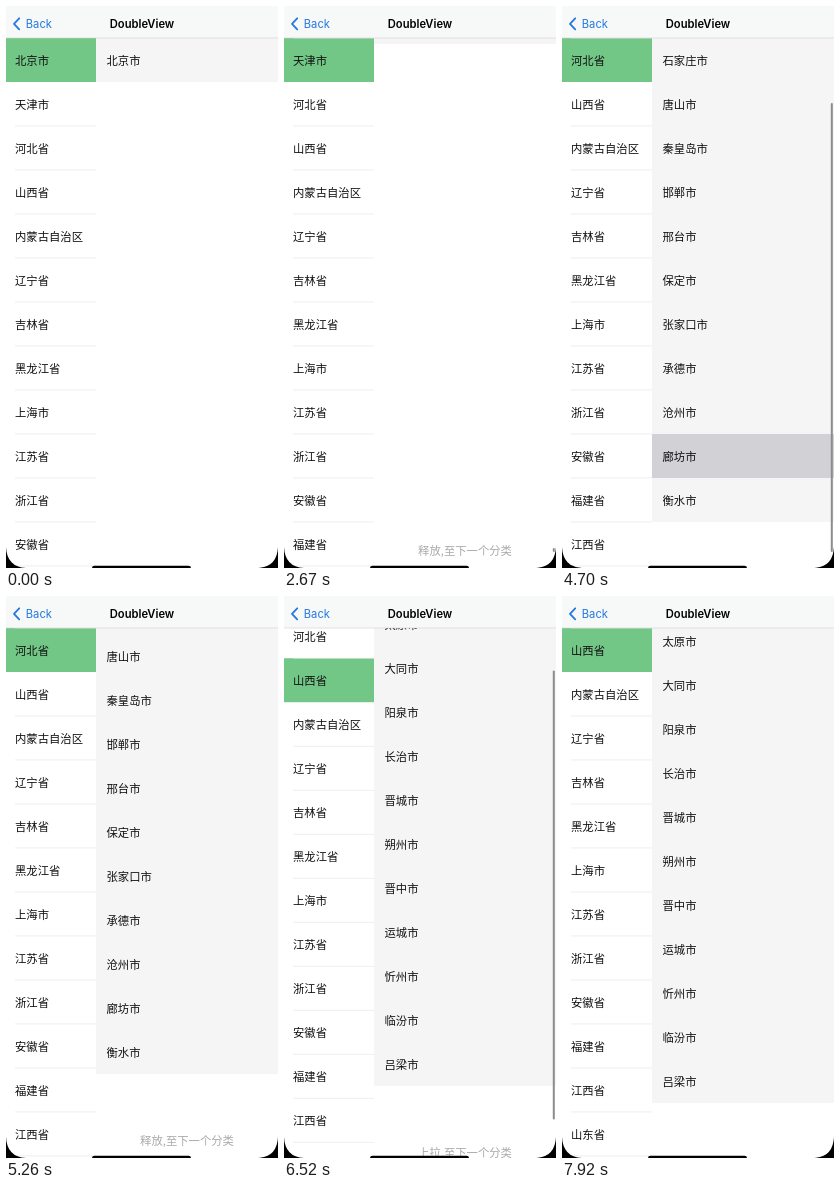
Write an HTML page that moves like this. It is 272x562 px and loops after 7990 ms.

```html
<!DOCTYPE html>
<html lang="zh-CN">
<head>
<meta charset="utf-8">
<title>DoubleView</title>
<style>
  html, body { margin: 0; width: 100%; height: 100%; overflow: hidden; background: #fff; }
  svg { display: block; width: 100vw; height: 100vh; }
  text { font: 11.35px "Noto Sans CJK SC", "Noto Sans CJK", sans-serif; fill: #111; }
  .nav { font-family: Inter, Roboto, sans-serif; font-size: 11.2px; }
  .title { font-weight: 600; fill: #000; }
  .back { fill: #2478e0; }
  .hint { fill: #aaa; text-anchor: middle; }
</style>
</head>
<body>
<svg viewBox="0 0 272 562" preserveAspectRatio="none">
  <defs>
    <clipPath id="leftClip"><rect y="32" width="90" height="530"/></clipPath>
    <clipPath id="rightClip"><rect x="90" y="32" width="182" height="530"/></clipPath>
  </defs>
  <rect width="272" height="562" fill="#fff"/>
  <g clip-path="url(#leftClip)"><g id="left"></g></g>
  <g clip-path="url(#rightClip)">
    <g id="right"></g>
    <text id="hint" class="hint" x="181"></text>
  </g>
  <rect id="bar" x="268.8" width="2" rx="1" fill="#8c8c8c"/>
  <rect width="272" height="32" fill="#f7f8f8"/>
  <rect y="31.7" width="272" height=".6" fill="#cfcfcf"/>
  <path d="M13.2 12.3 L8 17.8 L13.2 23.3" fill="none" stroke="#2478e0" stroke-width="1.8" stroke-linecap="round" stroke-linejoin="round"/>
  <text class="nav back" x="19.8" y="21.8">Back</text>
  <text class="nav title" x="136" y="21.8" text-anchor="middle">DoubleView</text>
  <path d="M0 541 Q1 561 20 562 H0Z M272 541 Q271 561 252 562 H272Z"/>
  <path d="M86 562 Q86 559.7 88.5 559.7 H182.5 Q185 559.7 185 562Z"/>
</svg>
<script>
const LOOP = 7990, TOP = 32, ROW = 44;
const provinces = '北京市 天津市 河北省 山西省 内蒙古自治区 辽宁省 吉林省 黑龙江省 上海市 江苏省 浙江省 安徽省 福建省 江西省 山东省 河南省'.split(' ');
const cities = [
  '北京市',
  '天津市',
  '石家庄市 唐山市 秦皇岛市 邯郸市 邢台市 保定市 张家口市 承德市 沧州市 廊坊市 衡水市',
  '太原市 大同市 阳泉市 长治市 晋城市 朔州市 晋中市 运城市 忻州市 临汾市 吕梁市'
].map(names => names.split(' '));
const PRESSED_ROW = 9;

// Moments at which the next province becomes current
const switches = [990, 3420, 6398];
// Finger drags as [time, pull distance]
const drags = [
  [[500, 0], [940, 46], [990, 46]],
  [[1930, 0], [2670, 38], [3300, 42], [3420, 42]],
  [[4760, 0], [5470, 48], [5820, 51], [6310, 52], [6398, 52]],
  [[7450, 0], [7920, 9], [7990, 10]]
];

const $ = id => document.getElementById(id);
const clamp = x => Math.max(0, Math.min(1, x));
const ease = x => x * x * (3 - 2 * x);
const between = (t, a, b) => t >= a && t < b;

function add(parent, tag, attrs, text) {
  const node = document.createElementNS('http://www.w3.org/2000/svg', tag);
  for (const key in attrs) node.setAttribute(key, attrs[key]);
  if (text) node.textContent = text;
  parent.append(node);
  return node;
}

const marker = add($('left'), 'rect', { width: 90, height: ROW, fill: '#73c786' });
const lines = provinces.map((name, i) => {
  const y = TOP + i * ROW;
  add($('left'), 'text', { x: 9, y: y + 26.8 }, name);
  return add($('left'), 'rect', { x: 9, y: y + 43.6, width: 81, height: .7, fill: '#e6e6e6' });
});

const pages = cities.map(names => {
  const page = add($('right'), 'g', {});
  add(page, 'rect', { x: 90, y: TOP, width: 182, height: names.length * ROW, fill: '#f5f5f5' });
  return page;
});
const pressed = add(pages[2], 'rect', { x: 90, y: TOP + PRESSED_ROW * ROW, width: 182, height: ROW, fill: '#d1d1d6' });
cities.forEach((names, p) => names.forEach((name, i) =>
  add(pages[p], 'text', { x: 100.5, y: TOP + i * ROW + 26.8 }, name)));

function along(points, t) {
  for (let i = 1; i < points.length; i++) {
    const [t0, v0] = points[i - 1], [t1, v1] = points[i];
    if (t <= t1) return v0 + (v1 - v0) * ease(clamp((t - t0) / (t1 - t0)));
  }
  return points[points.length - 1][1];
}

function pullAt(t, current) {
  const drag = drags[current];
  if (t >= drag[0][0]) return along(drag, t);
  if (!current) return 0;
  const peak = drags[current - 1].at(-1)[1];
  const pull = peak * Math.exp(-(t - switches[current - 1]) * .0056);
  return pull < .4 ? 0 : pull;
}

function barAt(t, pull) {
  if (between(t, 940, 1410)) return [184, 9];
  if (between(t, 2400, 2740)) return [542, 4];
  if (between(t, 3500, 5000) || between(t, 6398, 7260)) return [97 - pull * .86, 449];
  return [0, 0];
}

function draw(t) {
  const current = switches.filter(s => t >= s).length;
  const pull = pullAt(t, current);
  const scroll = switches.reduce((sum, s) => sum + ROW * ease(clamp((t - s) / 330)), 0);

  $('left').setAttribute('transform', `translate(0 ${-scroll})`);
  marker.setAttribute('y', TOP + current * ROW);
  lines.forEach((line, i) => line.setAttribute('opacity', i === current ? 0 : 1));

  $('right').setAttribute('transform', `translate(0 ${-pull})`);
  pages.forEach((page, i) => page.setAttribute('display', i === current ? 'inline' : 'none'));
  pressed.setAttribute('opacity', between(t, 4690, 4840) ? 1 : 0);

  const dragging = t >= drags[current][0][0];
  $('hint').textContent = (dragging && pull > 32 ? '释放' : '上拉') + ',至下一个分类';
  $('hint').setAttribute('y', 587.2 - pull);

  const [y, height] = barAt(t, pull);
  $('bar').setAttribute('y', y);
  $('bar').setAttribute('height', height);
}

const start = performance.now();
function tick() {
  draw((performance.now() - start) % LOOP);
  requestAnimationFrame(tick);
}
tick();
</script>
</body>
</html>
```
